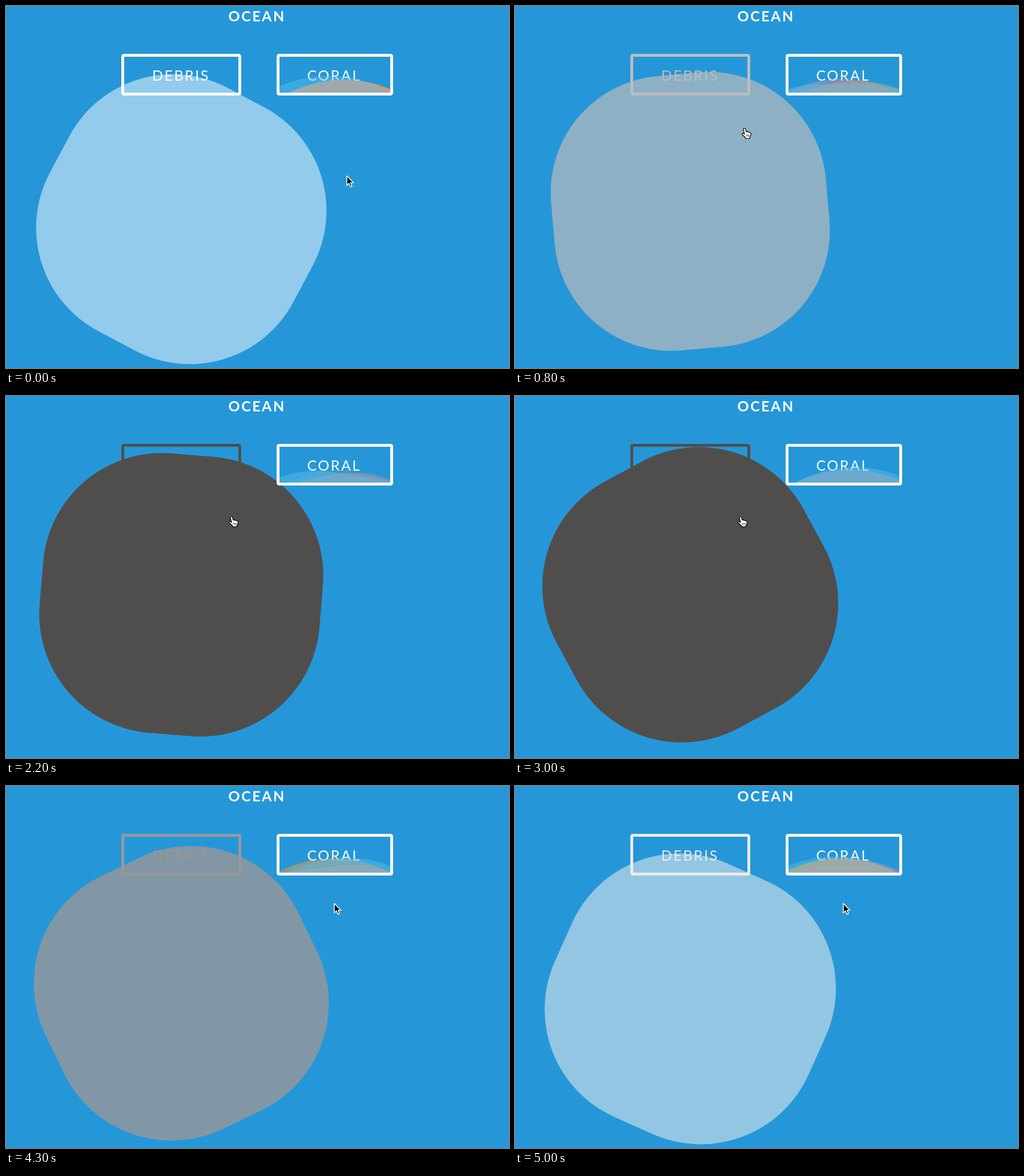
Animation, 881 px wide and 635 px high, one loop 5.1 s. Source, as an HTML page with a canvas:

```html
<!DOCTYPE html>
<html lang="en">
<head>
<meta charset="utf-8">
<title>Ocean</title>
<style>
  html, body { margin: 0; width: 100%; height: 100%; overflow: hidden; background: #2597d8; }
  canvas { display: block; }
</style>
</head>
<body>
<canvas id="stage" width="881" height="635"></canvas>
<script>
const ctx = document.getElementById('stage').getContext('2d');
const LOOP = 5100, STEP = 100;
const ENTER = 330, LEAVE = 3790;
const ROUNDNESS = .425;

// cubic-bezier(.25, .1, .25, 1), solved by bisection
function ease(x) {
  if (x <= 0) return 0;
  if (x >= 1) return 1;
  const bez = (a, b, u) => 3 * a * u * (1 - u) ** 2 + 3 * b * u * u * (1 - u) + u ** 3;
  let lo = 0, hi = 1;
  for (let i = 0; i < 24; i++) {
    const mid = (lo + hi) / 2;
    if (bez(.25, .25, mid) < x) lo = mid; else hi = mid;
  }
  return bez(.1, 1, lo);
}

const hover = (t, duration) => ease((t - ENTER) / duration) - ease((t - LEAVE) / duration);

function smoothstep(from, to, t) {
  const x = Math.min(1, Math.max(0, (t - from) / (to - from)));
  return x * x * (3 - 2 * x);
}

const spin = (t, start, period) => start + 360 * t / period;

function blob(x, y, size, degrees, fill) {
  ctx.save();
  ctx.translate(x, y);
  ctx.rotate(degrees * Math.PI / 180);
  ctx.beginPath();
  ctx.roundRect(-size / 2, -size / 2, size, size, size * ROUNDNESS);
  ctx.fillStyle = fill;
  ctx.fill();
  ctx.restore();
}

function label(text, x, y, weight, color) {
  ctx.font = `${weight} 25px Lato, sans-serif`;
  ctx.letterSpacing = '2.5px';
  ctx.fillStyle = color;
  ctx.fillText(text, x, y);
}

function frame(x, width, color) {
  ctx.strokeStyle = color;
  ctx.lineWidth = 5;
  ctx.beginPath();
  ctx.roundRect(x + 2.5, 86.5, width - 5, 68, 2);
  ctx.stroke();
}

function drawDebris(t) {
  const p = hover(t, 2000);
  const rgb = [80, 78, 77].map(c => Math.round(255 + (c - 255) * p)).join();
  const size = 483 + 9 * hover(t - 700, 1500);
  frame(202, 210, `rgb(${rgb})`);
  label('DEBRIS', 256, 130.5, 400, `rgb(${rgb})`);
  blob(307, 374 - 25.3 * hover(t, 1500), size, spin(t, 28, 5055), `rgba(${rgb},${.5 + .5 * p})`);
}

// Three translucent waves, each with its own period; the orange one fades in and out.
function drawCoral(t) {
  const glow = .1 + .7 * Math.cos(Math.PI * t / 5000) ** 6;
  frame(474, 204, '#fff');
  label('CORAL', 527.5, 130.5, 400, '#fff');
  ctx.save();
  ctx.beginPath();
  ctx.rect(479, 89, 194, 63);
  ctx.clip();
  blob(576, 386, 488, spin(t, 63, 2975), `rgba(245,158,60,${glow})`);
  blob(576, 386, 486, spin(t, 60, 4045), 'rgba(235,143,157,.38)');
  blob(576, 386, 498, spin(t, 33, 5070), 'rgba(90,190,235,.45)');
  ctx.restore();
}

const ARROW = new Path2D('M0 0V16.5L3.8 13 6.3 19 9 17.8 6.5 12H11.6Z');
const HAND = new Path2D('M-2 1C-2-1 1-1 1.6 1L3.2 6C4 4.8 5.6 5 6 6.3C7 5.4 8.4 5.8 8.7 7' +
  'C10 6.4 11.2 7.2 11.2 8.6V12L9.4 15V17.3H1.5V15.5L-4 10.5C-5.2 8.8-3.3 7.6-2 8.6L0 10Z');
const FINGERS = new Path2D('M3.2 10.5V14M5.6 10.5V14M8 10.5V14');

function drawCursor(t) {
  const pointing = t >= ENTER && t < LEAVE;
  const arrive = smoothstep(0, 900, t), depart = smoothstep(3350, 4000, t);
  ctx.save();
  ctx.translate(597 - 202 * arrive + 180 * depart, 298 - 86 * arrive - 6 * depart);
  ctx.lineJoin = 'round';
  ctx.lineWidth = pointing ? 1.2 : 1.5;
  ctx.fillStyle = pointing ? '#fff' : '#000';
  ctx.strokeStyle = pointing ? '#000' : '#fff';
  const shape = pointing ? HAND : ARROW;
  ctx.fill(shape);
  ctx.stroke(shape);
  if (pointing) {
    ctx.lineWidth = .8;
    ctx.stroke(FINGERS);
  }
  ctx.restore();
}

function draw(now) {
  const t = Math.floor((now % LOOP) / STEP) * STEP;
  ctx.fillStyle = '#2597d8';
  ctx.fillRect(0, 0, 881, 635);
  label('OCEAN', 389.5, 27, 700, '#fff');
  drawDebris(t);
  drawCoral(t);
  drawCursor(t);
}

const start = performance.now();
function tick() {
  draw(performance.now() - start);
  requestAnimationFrame(tick);
}
tick();
</script>
</body>
</html>
```
